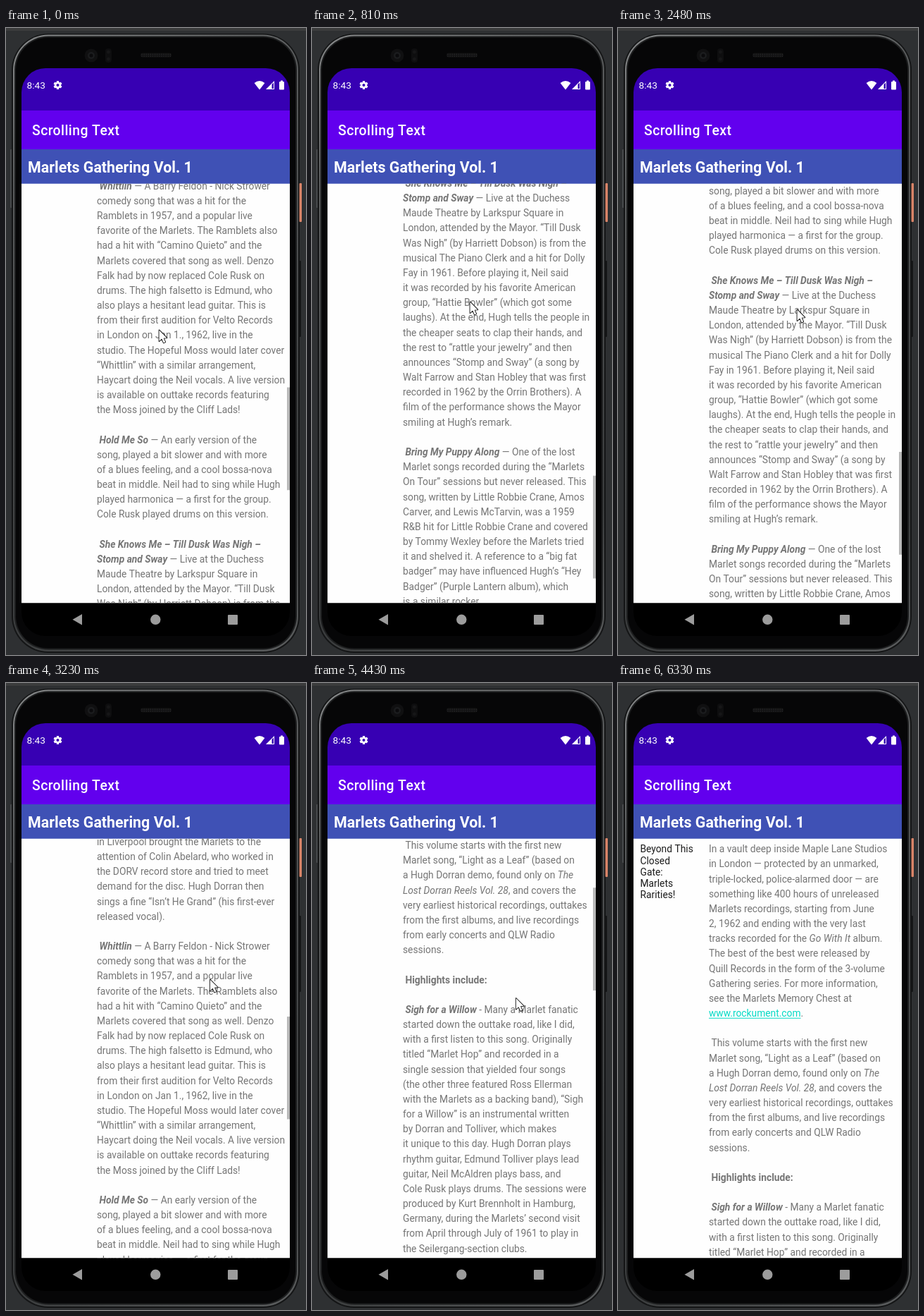
An HTML page with a canvas for the animation above (6.89 s loop, 426x889 px).

```html
<!DOCTYPE html>
<html lang="en">
<head>
<meta charset="utf-8">
<title>Scrolling Text</title>
<style>
html, body { margin: 0; width: 100%; height: 100%; overflow: hidden; background: #2e3032; }
canvas { display: block; width: 426px; height: 889px; }
</style>
</head>
<body>
<canvas id="stage"></canvas>
<script>
const W = 426, H = 889, LOOP = 6890;
const LEFT = 22, RIGHT = 403, TOP = 220.4, BOTTOM = 815.6;
const WIDE = RIGHT - LEFT, TALL = BOTTOM - TOP;
const LINE = 21.167, MAX_SCROLL = 1836, TEXT_SIZE = 13.8;
const FACE = 'Roboto, "Open Sans", sans-serif';

const canvas = document.getElementById('stage');
const dpr = window.devicePixelRatio || 1;
canvas.width = W * dpr;
canvas.height = H * dpr;
const c = canvas.getContext('2d');

// Markup: *bold italic*  _italic_  ^bold^  ~link~
const article = `In a vault deep inside Maple Lane Studios
in London — protected by an unmarked,
triple-locked, police-alarmed door — are
something like 400 hours of unreleased
Marlets recordings, starting from June
2, 1962 and ending with the very last
tracks recorded for the _Go With It_ album.
The best of the best were released by
Quill Records in the form of the 3-volume
Gathering series. For more information,
see the Marlets Memory Chest at
~www.rockument.com~.

 This volume starts with the first new
Marlet song, “Light as a Leaf” (based on
a Hugh Dorran demo, found only on _The_
_Lost Dorran Reels Vol. 28_, and covers the
very earliest historical recordings, outtakes
from the first albums, and live recordings
from early concerts and QLW Radio
sessions.

 ^Highlights include:^

 *Sigh for a Willow* - Many a Marlet fanatic
started down the outtake road, like I did,
with a first listen to this song. Originally
titled “Marlet Hop” and recorded in a
single session that yielded four songs
(the other three featured Ross Ellerman
with the Marlets as a backing band), “Sigh
for a Willow” is an instrumental written
by Dorran and Tolliver, which makes
it unique to this day. Hugh Dorran plays
rhythm guitar, Edmund Tolliver plays lead
guitar, Neil McAldren plays bass, and
Cole Rusk plays drums. The sessions were
produced by Kurt Brennholt in Hamburg,
Germany, during the Marlets’ second visit
from April through July of 1961 to play in
the Seilergang-section clubs.

 *My Maisie* and *Isn’t He Grand* — At the
same session, the Marlets played on “My
Maisie” (the first-ever single with Marlets
playing), as the backing band for English
singer Ross Ellerman, originally a member
of the Kites. The popularity of this single
in Liverpool brought the Marlets to the
attention of Colin Abelard, who worked in
the DORV record store and tried to meet
demand for the disc. Hugh Dorran then
sings a fine “Isn’t He Grand” (his first-ever
released vocal).

 *Whittlin* — A Barry Feldon - Nick Strower
comedy song that was a hit for the
Ramblets in 1957, and a popular live
favorite of the Marlets. The Ramblets also
had a hit with “Camino Quieto” and the
Marlets covered that song as well. Denzo
Falk had by now replaced Cole Rusk on
drums. The high falsetto is Edmund, who
also plays a hesitant lead guitar. This is
from their first audition for Velto Records
in London on Jan 1., 1962, live in the
studio. The Hopeful Moss would later cover
“Whittlin” with a similar arrangement,
Haycart doing the Neil vocals. A live version
is available on outtake records featuring
the Moss joined by the Cliff Lads!

 *Hold Me So* — An early version of the
song, played a bit slower and with more
of a blues feeling, and a cool bossa-nova
beat in middle. Neil had to sing while Hugh
played harmonica — a first for the group.
Cole Rusk played drums on this version.

 *She Knows Me – Till Dusk Was Nigh –*
*Stomp and Sway* — Live at the Duchess
Maude Theatre by Larkspur Square in
London, attended by the Mayor. “Till Dusk
Was Nigh” (by Harriett Dobson) is from the
musical The Piano Clerk and a hit for Dolly
Fay in 1961. Before playing it, Neil said
it was recorded by his favorite American
group, “Hattie Bowler” (which got some
laughs). At the end, Hugh tells the people in
the cheaper seats to clap their hands, and
the rest to “rattle your jewelry” and then
announces “Stomp and Sway” (a song by
Walt Farrow and Stan Hobley that was first
recorded in 1962 by the Orrin Brothers). A
film of the performance shows the Mayor
smiling at Hugh’s remark.

 *Bring My Puppy Along* — One of the lost
Marlet songs recorded during the “Marlets
On Tour” sessions but never released. This
song, written by Little Robbie Crane, Amos
Carver, and Lewis McTarvin, was a 1959
R&B hit for Little Robbie Crane and covered
by Tommy Wexley before the Marlets tried
it and shelved it. A reference to a “big fat
badger” may have influenced Hugh’s “Hey
Badger” (Purple Lantern album), which
is a similar rocker.

 *Six Before 414* — A song recorded for the
_Go With It_ album was actually worked on
way back in the beginning, six years earlier.
This take shows how they did it much more
slowly, with an R&B feel to it.`.split('\n');
const sidebar = ['Beyond This', 'Closed', 'Gate:', 'Marlets', 'Rarities!'];

// The picture refreshes only at these moments (ms).
const ticks = [0, 160, 300, 420, 540, 660, 810, 960, 1080, 1230, 1350, 1500, 1620,
  1770, 1920, 2050, 2200, 2330, 2480, 2610, 2750, 2870, 2990, 3110, 3230, 3380, 3500,
  3650, 3770, 3920, 4050, 4190, 4310, 4430, 4580, 4700, 4850, 4980, 5130, 5260, 5400,
  5520, 5640, 5790, 5910, 6330];

// Keys: time, then values.
const scrollKeys = [[0, 1180.7], [810, 1692.5], [1230, MAX_SCROLL], [1920, MAX_SCROLL],
  [2480, 1554.7], [3920, 550], [4980, 0], [5260, 0], [5790, 5]];
const pointerKeys = [[0, 217, 428], [300, 222, 310], [540, 225, 470], [810, 224, 388],
  [1350, 230, 362], [1500, 228, 648], [1620, 230, 636], [1770, 236, 510], [2050, 248, 320],
  [2480, 254, 399], [2750, 262, 600], [3110, 280, 360], [3920, 343, 766], [4310, 300, 400],
  [4980, 240, 660], [5130, 238, 429], [5260, 238, 410], [5640, 248, 560], [5790, 262, 832]];
const bottomGlow = [[1080, 0], [1350, .5], [1500, .57], [1620, 0]];
const topGlow = [[4850, 0], [5130, .56], [5640, 0]];

function at(keys, t) {
  const n = keys.findIndex(k => k[0] > t);
  if (n < 0) return keys[keys.length - 1].slice(1);
  if (n === 0) return keys[0].slice(1);
  const a = keys[n - 1], b = keys[n], p = (t - a[0]) / (b[0] - a[0]);
  return a.slice(1).map((v, i) => v + (b[i + 1] - v) * p);
}

function box(x, y, w, h, fill, r = 0) {
  c.fillStyle = fill;
  c.beginPath();
  c.roundRect(x, y, w, h, r);
  c.fill();
}

function disc(x, y, r, fill) {
  c.fillStyle = fill;
  c.beginPath();
  c.arc(x, y, r, 0, 7);
  c.fill();
}

function poly(points, fill) {
  c.beginPath();
  points.forEach(([x, y]) => c.lineTo(x, y));
  c.closePath();
  c.fillStyle = fill;
  c.fill();
}

function label(str, x, y, size, weight, fill, gap = 0) {
  c.font = `${weight} ${size}px ${FACE}`;
  c.letterSpacing = gap + 'px';
  c.fillStyle = fill;
  c.fillText(str, x, y);
  c.letterSpacing = '0px';
}

const styles = { '*': 'italic bold', '_': 'italic 400', '^': 'bold', '~': '400' };

function richLine(line, x, y) {
  let mark = '';
  for (const part of line.split(/([*_^~])/)) {
    if (styles[part]) {
      mark = mark ? '' : part;
    } else if (part) {
      const color = mark === '~' ? '#03dac5' : '#757575';
      label(part, x, y, TEXT_SIZE, styles[mark] || '400', color);
      const w = c.measureText(part).width;
      if (mark === '~') box(x, y + 1.5, w, 1, color);
      x += w;
    }
  }
}

function phone() {
  box(0, 0, W, H, '#2e3032');
  box(0, 0, W, 4, '#3b3c3d');
  box(6, 172, 3, 83, '#484a4c', 1);

  const metal = c.createLinearGradient(0, 8, W, H);
  metal.addColorStop(0, '#8a8c8d');
  metal.addColorStop(.2, '#5a5c5d');
  metal.addColorStop(.8, '#3a3c3d');
  metal.addColorStop(1, '#5e6061');
  box(8, 8, 409, 878, '#141516', 52);
  box(10, 9.5, 405, 874.5, metal, 50);
  box(12, 11.5, 401, 870, '#1d1e1f', 48);
  box(14, 13.5, 397, 866, '#060607', 46);

  box(416.5, 220, 3.5, 55, '#d98468', 1);
  box(416, 330, 3, 108, '#141516', 1);

  disc(121, 39, 9.5, '#101011');
  disc(121, 39, 5, '#1b1c1e');
  disc(121, 39, 2.5, '#0a0a0c');
  box(141, 29, 9, 20, '#0e0e0f', 4);
  disc(145.5, 34, 2.5, '#161617');
  disc(145.5, 44, 2.5, '#161617');
  box(191, 35.5, 44, 6, '#121213', 3);
  for (let i = 0; i < 28; i++) {
    disc(193 + (i % 14) * 3.1, i < 14 ? 37.2 : 40, .7, '#2c2c2d');
  }
}

function statusIcons() {
  label('8:43', 29.5, 86, 13.7, '400', '#fff');

  c.save();
  c.translate(73.5, 81);
  for (let i = 0; i < 6; i++) {
    box(-1.6, -6, 3.2, 4, '#fff', .5);
    c.rotate(Math.PI / 3);
  }
  disc(0, 0, 4.6, '#fff');
  disc(0, 0, 2, '#3700b3');
  c.restore();

  c.fillStyle = '#fff';
  c.beginPath();
  c.moveTo(360, 87.5);
  c.lineTo(352.6, 78);
  c.quadraticCurveTo(360, 72.2, 367.4, 78);
  c.fill();

  poly([[381, 75], [381, 87], [369, 87]], '#fff');
  poly([[380, 77.4], [380, 86], [377.5, 86], [377.5, 79.9]], '#3700b3');
  box(388, 76, 7, 11.5, '#fff', 1);
  box(390, 74.5, 3, 2, '#fff');
}

function glow(keys, t, fromTop, shift) {
  const [k] = at(keys, t);
  if (k <= 0) return;
  const r = WIDE * 1.2, depth = r * (1 - Math.cos(Math.PI / 6));
  c.save();
  c.translate((LEFT + RIGHT) / 2 + shift, fromTop ? TOP : BOTTOM);
  c.scale(1, fromTop ? k : -k);
  disc(0, depth - r, r, `rgba(98, 0, 238, ${k * .2})`);
  c.restore();
}

function list(t) {
  const [scroll] = at(scrollKeys, t);
  c.save();
  c.beginPath();
  c.rect(LEFT, TOP, WIDE, TALL);
  c.clip();
  box(LEFT, TOP, WIDE, TALL, '#fefefe');

  const y0 = 245.3 - scroll;
  sidebar.forEach((s, i) => label(s, 31.5, y0 + i * 16.23, TEXT_SIZE, '400', '#1c1c1c'));
  article.forEach((s, i) => {
    const y = y0 + i * LINE;
    if (y > TOP - 8 && y < BOTTOM + 16) richLine(s, 129, y);
  });

  const thumb = TALL * TALL / (TALL + MAX_SCROLL);
  c.globalAlpha = t < 5910 ? 1 : t < 6330 ? .5 : .06;
  box(399, TOP + scroll / MAX_SCROLL * (TALL - thumb), 4, thumb, '#b9b9b9');
  c.globalAlpha = 1;

  glow(bottomGlow, t, false, 8);
  glow(topGlow, t, true, 13);
  c.restore();
}

function screen(t) {
  c.save();
  c.beginPath();
  c.roundRect(LEFT, 57, WIDE, 805, 34);
  c.clip();
  box(LEFT, 57, WIDE, 60, '#3700b3');
  box(LEFT, 117, WIDE, 55, '#6200ee');
  box(LEFT, 172, WIDE, TOP + 1 - 172, '#3f51b5');
  statusIcons();
  label('Scrolling Text', 37, 152.3, 19.4, '500', '#fff', .42);
  label('Marlets Gathering Vol. 1', 31, 204.8, 21.4, 'bold', '#fff');
  box(LEFT, BOTTOM - 1, WIDE, 48, '#000');
  list(t);
  poly([[94.5, 838.8], [108, 831], [108, 846.6]], '#9c9c9c');
  disc(212.3, 838.8, 7.2, '#9c9c9c');
  box(315, 832, 14, 14, '#9c9c9c', 1);
  c.restore();
}

function pointer(t) {
  if (t >= 5910) return;
  const [x, y] = at(pointerKeys, t);
  c.save();
  c.translate(x, y);
  c.lineWidth = 1.8;
  c.lineJoin = 'round';
  c.strokeStyle = '#111';
  c.beginPath();
  [[.5, .5], [.5, 16], [4.2, 12.6], [6.8, 18.4], [9.2, 17.3], [6.7, 11.7], [11.3, 11.4]]
    .forEach(p => c.lineTo(...p));
  c.closePath();
  c.stroke();
  c.fillStyle = '#fff';
  c.fill();
  c.restore();
}

function frame(now) {
  const time = Math.max(0, now - start) % LOOP;
  const t = ticks.filter(k => k <= time).pop();
  c.setTransform(dpr, 0, 0, dpr, 0, 0);
  phone();
  screen(t);
  pointer(t);
  requestAnimationFrame(frame);
}

const start = performance.now();
frame(start);
</script>
</body>
</html>
```
